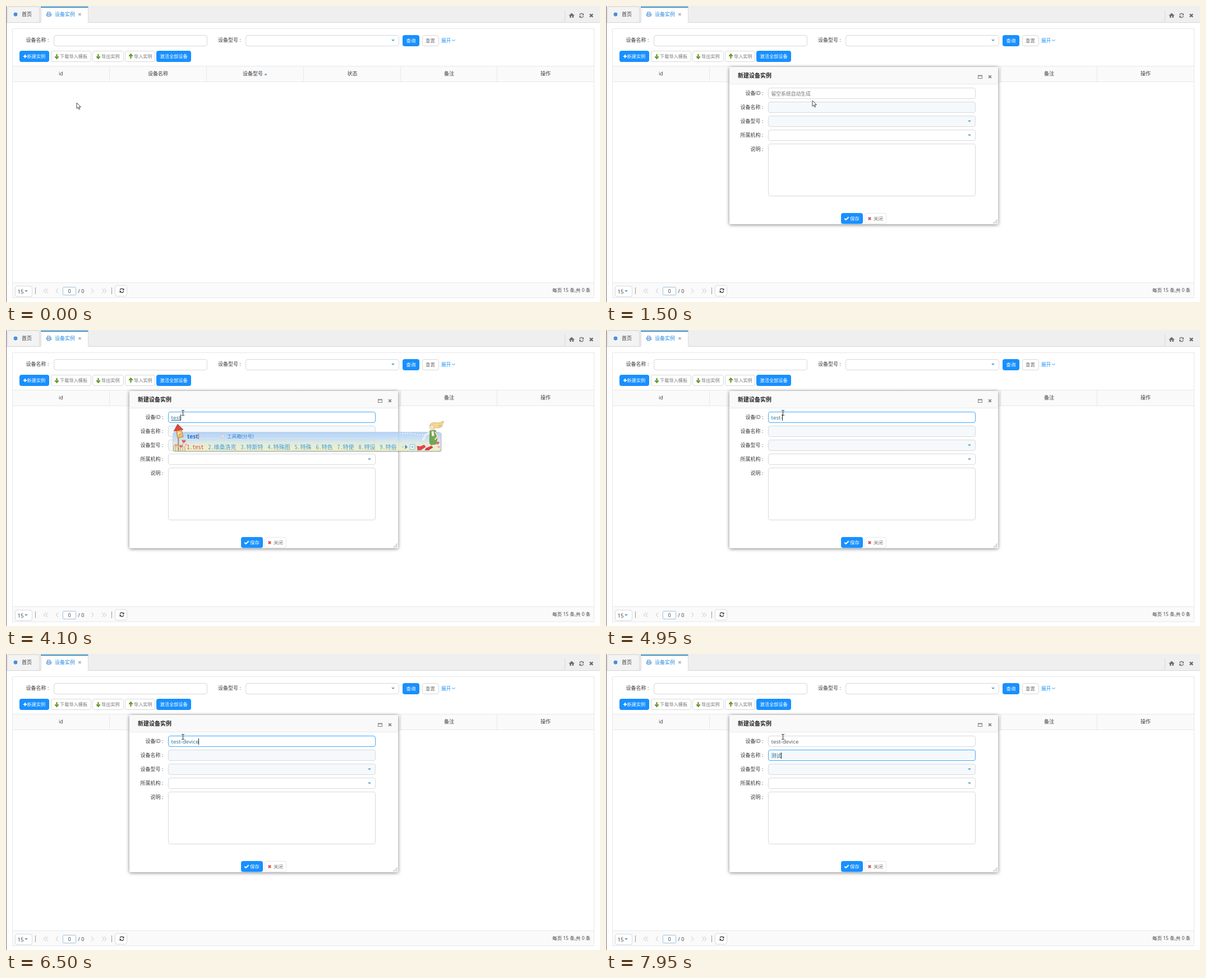
An HTML page for the animation above (8000 ms loop, 1059 by 529 pixels).

```html
<!DOCTYPE html>
<html lang="zh-CN">
<head>
<meta charset="utf-8">
<title>设备实例</title>
<style>
html, body { margin: 0; width: 100%; height: 100%; overflow: hidden; background: #fff; }
svg { display: block; width: 100vw; height: 100vh; }
text { font-family: 'Open Sans', 'Noto Sans CJK SC', 'Noto Sans CJK', sans-serif; white-space: pre; }
.cand text { font-family: 'Noto Sans Mono CJK SC', 'Noto Sans CJK SC', 'Noto Sans CJK', monospace; }
</style>
</head>
<body>
<svg id="stage" viewBox="0 0 1059 529">
  <defs>
    <linearGradient id="sky" x2="0" y2="1">
      <stop stop-color="#a8cdf8"/><stop offset=".35" stop-color="#c3dcf3"/>
      <stop offset=".65" stop-color="#e2ebd6"/><stop offset="1" stop-color="#f5efb0"/>
    </linearGradient>
  </defs>
</svg>
<script>
const LOOP = 8000, STEP = 50;
const BLUE = '#1890ff', LINE = '#d9d9d9', INK = '#3c3c3c', GREY = '#777';
const stage = document.getElementById('stage');
const $ = id => document.getElementById(id);

// Drawing helpers
const text = (x, cy, s, size = 9, fill = INK, attrs = '') =>
  `<text x="${x}" y="${cy + size * .38}" font-size="${size}" fill="${fill}" ${attrs}>${s}</text>`;
const rect = (x, y, w, h, fill, attrs = '') =>
  `<rect x="${x}" y="${y}" width="${w}" height="${h}" fill="${fill}" ${attrs}/>`;
const path = (d, fill, attrs = '') => `<path d="${d}" fill="${fill}" ${attrs}/>`;
const stroke = (d, color, w = 1, attrs = '') =>
  path(d, 'none', `stroke="${color}" stroke-width="${w}" ${attrs}`);
const box = (x, y, w, h, fill = '#fff', color = LINE, attrs = '') =>
  rect(x + .5, y + .5, w - 1, h - 1, fill, `rx="3.5" stroke="${color}" ${attrs}`);
const solid = (x, y, w, h, attrs = '') => rect(x, y, w, h, BLUE, `rx="4" ${attrs}`);
const label = (right, cy, s) =>
  text(right, cy, s, 9, INK, 'text-anchor="end"') + text(right + 2.5, cy, ':');
const cross = (x, y, r, color, w = 2) =>
  stroke(`M${x - r} ${y - r}l${2 * r} ${2 * r}m0 ${-2 * r}l${-2 * r} ${2 * r}`, color, w);
const down = (x, y, color = '#5a9fc9', r = 3) =>
  path(`M${x - r} ${y - r / 2}h${2 * r}l${-r} ${r}z`, color);
const chevron = (x, y, dir, color) =>
  stroke(`M${x - dir * 2} ${y - 4}l${dir * 4} 4l${-dir * 4} 4`, color, 1);
const reload = (x, y, color) => `<g transform="translate(${x} ${y})">` +
  stroke('M-3.4-.8A3.5 3.5 0 0 1 2.8-2.2M3.4.8A3.5 3.5 0 0 1-2.8 2.2', color, 1.4) +
  path('M4-4v3.5h-3.5zM-4 4v-3.5h3.5z', color) + '</g>';
const greenArrow = (x, y, dir) => `<g transform="translate(${x} ${y}) scale(1 ${dir})">` +
  path('M-1.4-4h2.8v4h2.6l-4 4.6l-4-4.6h2.6z', '#7fa83c') +
  path('M-3.6 1.2l1.2-.8l2.4 2.6l2.4-2.6l1.2.8l-3.6 4z', '#5d8a2c') + '</g>';

function topBar() {
  return rect(0, 0, 1059, 30, '#efefef') + rect(0, 29, 1059, 1, '#d8d8d8') +
    path('M2.5 29.5V4a3 3 0 0 1 3-3H57a3 3 0 0 1 3 3V29.5z', '#f3f3f3', 'stroke="#d2d2d2"') +
    `<circle cx="17" cy="15" r="3.4" fill="#4a90d9"/>` + text(28, 15, '首页') +
    rect(62, 1, 84.5, 30, '#fff') + rect(62, 1, 84.5, 2, '#3c8dbc') +
    stroke('M62.5 3v26M146.5 3v26', '#ddd') +
    stroke('M74 14v-3h4.5v3M73 17h-.5v-3h8v3h-.8M74 16h4.7v2.5h-4.7z', '#4a90d9', 1.1) +
    text(87, 15, '设备实例', 9, '#2b8ce6') + cross(131.5, 15, 2, '#aaa', 1.5) +
    rect(996, 8, 1, 21, '#d8d8d8') +
    path('M1003.5 17l5-4.6l5 4.6l-.7.8l-.8-.7v4h-2.5v-3h-2v3h-2.5v-4l-.8.7z', '#707070') +
    reload(1026, 17, '#707070') + cross(1043.5, 17, 2.7, '#666', 2.2);
}

function toolbar() {
  const tool = (x, w, dir, s) => box(x, 80, w, 20) + greenArrow(x + 10.5, 90, dir) +
    text(x + 16, 90, s, 8.2, GREY);
  return rect(11.5, 40.5, 1037, 481, '#fff', 'stroke="#e8e8e8"') +
    label(71.5, 61, '设备名称') + box(85, 52, 274, 20) +
    label(414, 61, '设备型号') + box(427, 52, 274, 20) + down(690, 61.5) +
    solid(707, 52, 30, 20) + text(713.5, 61.5, '查询', 8.5, '#fff') +
    box(742, 52, 30, 20) + text(748, 61.5, '重置', 8.5, GREY) +
    text(776, 61.5, '展开', 8.7, BLUE) + stroke('M795.5 60.2l2.5 2.5l2.5-2.5', BLUE) +
    solid(24, 80, 53, 20, 'id="add"') + stroke('M31 90h6M34 87v6', '#fff', 2) +
    text(37.5, 90, '新建实例', 8.2, '#fff') +
    tool(80, 72, 1, '下载导入模板') + tool(154, 56, 1, '导出实例') +
    tool(212, 54, -1, '导入实例') +
    solid(268, 80, 62, 20) + text(274.5, 90, '激活全部设备', 8.2, '#fff');
}

function table() {
  const heads = [[98, 'id'], [271, '设备名称'], [440, '设备型号'], [617.5, '状态'], [790, '备注'], [962, '操作']];
  return rect(12, 107, 1036, 29, '#fafafa') + rect(12, 107, 172, 29, '#e6f7ff', 'id="idHead"') +
    stroke('M11 107.5H1049M11 135.5H1049', '#e8e8e8') +
    [184, 357, 530, 703, 875].map(x => rect(x, 107, 1, 29, '#e8e8e8')).join('') +
    heads.map(([x, s]) => text(x, 121, s, 9, INK, 'text-anchor="middle"')).join('') +
    path('M460 123.5h6l-3-3z', '#5a9fc9');
}

function footer() {
  const pale = '#c4c4c4';
  return rect(12, 495, 1036, 26, '#fafafa') + rect(11, 494, 1038, 1, '#e8e8e8') +
    box(16, 500, 31, 20) + text(20.5, 510, '15', 9.75) + down(36, 509.5) +
    rect(52, 503, 1, 12, '#999') + rect(188, 503, 1, 12, '#999') +
    chevron(69, 509, -1, pale) + chevron(73, 509, -1, pale) + chevron(91, 509, -1, pale) +
    chevron(154, 509, 1, pale) + chevron(173, 509, 1, pale) + chevron(177, 509, 1, pale) +
    rect(101.5, 502.5, 23, 14, '#fff', 'stroke="#9cc3dc" rx="1"') +
    text(113, 509.5, '0', 9, INK, 'text-anchor="middle"') + text(128.5, 509.5, '/ 0', 9) +
    box(194, 499, 22, 20) + reload(206.5, 508.5, '#444') +
    text(1042, 508, '每页 15 条,共 0 条', 8.5, INK, 'text-anchor="end"');
}

function dialog() {
  const rows = ['设备ID', '设备名称', '设备型号', '所属机构'];
  const fills = ['#fff', '#f5f9fc', '#f5f9fc', '#fff'];
  let grip = '';
  for (let i = 0; i < 3; i++)
    for (let j = 2 - i; j < 3; j++) grip += rect(691 + j * 2.5, 382 + i * 2.5, 1.2, 1.2, '#777');
  const form = rows.map((s, i) => label(275.5, 155.5 + 25 * i, s) +
    box(289, 146 + 25 * i, 370, 20, fills[i], LINE, `id="field${i}"`)).join('') +
    down(648, 206) + down(648, 231) +
    label(275.5, 255.5, '说明') + box(289, 246, 370, 94) +
    text(294.5, 156.5, '留空系统自动生成', 8.8, '#777', 'id="hint"') +
    text(294.5, 156.5, '', 9.75, '#555', 'id="value0"') + text(294.5, 181.5, '', 9, '#555', 'id="value1"') +
    '<path id="under" stroke="#2b6f8f"/><path id="caret" stroke="#222"/>' +
    solid(419, 370, 39, 19.5) + stroke('M425.3 379.8l2.4 2.4l5-5', '#fff', 2) +
    text(435, 379.5, '保存', 8.5, '#fff') +
    box(461, 370, 39, 19.5, '#fff', '#e6e6e6') + cross(470, 380, 2.2, '#d9534f', 2) +
    text(477, 379.5, '关闭', 8.5, GREY);
  return '<g id="dialog">' +
    rect(220, 109, 479, 281, '#fff', 'rx="2" style="filter:drop-shadow(0 1px 3px rgba(0,0,0,.5))"') +
    rect(220, 109, 479, 30, '#f9f9f9', 'rx="2"') + rect(220, 139, 479, 1, '#e8e8e8') +
    text(235, 124, '新建设备实例', 10, '#222', 'font-weight="700"') +
    rect(663.5, 124.5, 7, 5, 'none', 'stroke="#888"') + rect(663, 123.5, 8, 2, '#888') +
    cross(684.5, 126.5, 2.4, '#888', 1.9) + grip + `<g id="form">${form}</g></g>`;
}

// Input method window
const heart = (x, y, r, color = '#e8475a') =>
  path(`M${x} ${y + r}l${-r}${-r}a${r / 2} ${r / 2} 0 0 1 ${r}${-r / 2}a${r / 2} ${r / 2} 0 0 1 ${r} ${r / 2}z`, color);

const birdhouse = rect(9, 190, 2.5, 26, '#a8895c') +
  stroke('M2 216v-10M5.5 216v-12M14 216v-12M18 216v-14M22 216v-9', '#b59a6a', 1.3) +
  stroke('M1 209h22', '#d8c69a', 1.5) +
  path('M6 179l10-1l3 13l-10 2z', '#f0b34c', 'stroke="#8a5a20" stroke-width=".7"') +
  '<circle cx="12" cy="185" r="2.6" fill="#fbe3b0"/><circle cx="13" cy="186" r="1" fill="#7a4a1a"/>' +
  path('M2 181l7-13l10 10z', '#d92a1f', 'stroke="#8d1a12" stroke-width=".6"') +
  heart(20, 199, 3.4) + heart(6, 206, 2.8, '#e88a90') + heart(15, 208, 2.6) + heart(24, 205, 2.2, '#f0a0a8');

const girl = path('M-20 172c0-7 8-7 13-6c5 1 8-3 12-3c-1 5-4 8-9 8c3 1 5 1 7-1c-2 5-8 6-12 4l-5 4z', '#f3d27a', 'stroke="#a5803a" stroke-width=".6"') +
  '<circle cx="-16" cy="174" r="4.2" fill="#fbdcc0" stroke="#b58a60" stroke-width=".5"/>' +
  stroke('M-19 183l-9 5l-4 9', '#fff', 3) + stroke('M-19 183l-9 5l-4 9', '#d8b090', .6) +
  path('M-20 180l10-1c4 7 4 15 1 25l-10 2c-3-9 0-17-1-26z', '#5c9a35', 'stroke="#35641c" stroke-width=".6"') +
  path('M-17 181l4 0l1 8l-4 1z', '#f6efdf') + stroke('M-10 182l4 8l-5 6', '#fbdcc0', 2) +
  stroke('M-18 205l-12 4M-13 205l-4 4', '#fbdcc0', 2.4) +
  path('M-43 207l6 1l7-3l3 4l-9 6l-6 0z', '#d8283a') + path('M-27 211l10-4l3 3l-8 5h-7z', '#c32133') +
  heart(-6, 202, 3) + heart(-4, 209, 2.4, '#f0a0a8');

const itemWidth = s => [...s].reduce((w, c) => w + (c > '\xff' ? 10 : 5), 0);

function imeWindow(typed, cands) {
  let x = 25.5, list = '';
  cands.split(' ').forEach((c, i) => {
    const s = `${i + 1}.${c}`;
    list += text(x, 209, s, 10, i ? '#1f8fe6' : '#e0262c');
    x += itemWidth(s) + 8;
  });
  const end = x - 8, right = end + 79;
  const tip = typed === 'test'
    ? rect(86.5, 187, 6, 6, '#e9e4ee', 'rx="1.5" stroke="#b9a9c4" stroke-width=".7"') +
      text(89.5, 190, 'i', 5, '#d0504a', 'text-anchor="middle"') +
      text(97, 190, '工具箱(分号)', 8.5, '#1674d0') : '';
  return rect(1, 183, right, 35, '#777', 'rx="4" opacity=".55"') +
    rect(.5, 182.5, right - 1, 33.5, 'url(#sky)', 'rx="4" stroke="#b9cfdd"') +
    stroke(`M${right - 74} 185.5q18-2 30 1t14-1`, '#fff', 1.2, 'stroke-dasharray="2 2.5"') +
    birdhouse + text(26, 190, typed, 10, '#0d5cc4', 'font-weight="700" id="typed"') +
    '<path id="bar" stroke="#e0262c"/>' + tip + `<g class="cand">${list}</g>` +
    path(`M${end + 12} 206v6l-3.5-3z`, '#b8cfe0') + path(`M${end + 15} 205v8l4.5-4z`, '#1778d8') +
    rect(end + 23.5, 204.5, 9, 9, '#e6f2fa', 'rx="1" stroke="#6fb0dd"') + down(end + 28, 209.2, '#1778d8', 2) +
    `<g transform="translate(${right} 0)">${girl}</g>`;
}

const cursors = {
  arrow: path('M0 0V10.2L2.4 8L4 11.8L5.7 11L4.1 7.4H7.3Z', '#fff', 'stroke="#333" stroke-width=".9"'),
  hand: path('M-1 1a1 1 0 0 1 2 0v4l5 1.3q1 .4.8 1.5l-.9 4.2h-5.4l-4-5q.6-1.4 2.5.4z', '#fff', 'stroke="#333" stroke-width=".9"'),
  move: path('M0-6.5l2.5 2.7h-1.5v2.8h2.8v-1.5l2.7 2.5l-2.7 2.5v-1.5h-2.8v2.8h1.5l-2.5 2.7l-2.5-2.7h1.5v-2.8h-2.8v1.5l-2.7-2.5l2.7-2.5v1.5h2.8v-2.8h-1.5z', '#fff', 'stroke="#333" stroke-width=".9"'),
  beam: stroke('M-2.5-4.5h2l.5.5l.5-.5h2M0-4v8M-2.5 4.5h2l.5-.5l.5.5h2', '#333')
};

stage.insertAdjacentHTML('beforeend',
  topBar() + toolbar() + table() + footer() + rect(0, 0, 1, 529, '#77707c') + dialog() +
  '<g id="status">' + rect(-3.5, 518.5, 28, 14, '#f4f4f4', 'rx="3" stroke="#dcdcdc"') +
  text(-1, 525, '板.xlsx', 7, '#666') + '</g><g id="ime"></g>' +
  Object.entries(cursors).map(([k, s]) => `<g id="${k}">${s}</g>`).join(''));

// Typing: time, field, committed text, text being composed, candidates
const typing = [
  [0, -1, '', ''],
  [2250, 0, '', ''],
  [3100, 0, '', 't', '他 她 它 天 太 头 条 听 图'],
  [3250, 0, '', 'te', '特 忒 铽 忑 慝 貣 蟘 脦 鋱'],
  [3500, 0, '', 'tes', '特色 特殊 特设 特使 特别是 特俗 特首 特工队 特赦'],
  [3650, 0, '', 'test', 'test 维桑洛克 特斯特 特殊图 特殊 特色 特使 特设 特俗'],
  [4150, 0, 'test', ''],
  [4950, 0, 'test-', ''],
  [5200, 0, 'test-', 'd', '的 都 到 大家 电话 等待 对 但是 多少'],
  [5250, 0, 'test-', 'de', '的 得 德 地 嘚 锝 鍀 淂 惪'],
  [5550, 0, 'test-', 'dev', 'Dev 的女⊘ 的 得 德 地 嘚 锝 鍀'],
  [5950, 0, 'test-', 'devi', 'devi 的为 得为 的 得 德 地 嘚 锝'],
  [6100, 0, 'test-', 'devic', 'devic 的此 得此 德才 的 得 德 地 嘚'],
  [6200, 0, 'test-', 'device', 'device 的 得 德 地 嘚 锝 鍀 淂'],
  [6500, 0, 'test-device', ''],
  [6800, 1, '', ''],
  [7100, 1, '', 'c', '从 才 次 错 草 此 存 猜 曾'],
  [7250, 1, '', 'ce', '测 册 侧 策 厕 恻 岑 参 曾'],
  [7450, 1, '', 'ceshi', '测试 侧室 测时 策士 侧视 测试仪 册使 侧石 测师'],
  [7950, 1, '测试', '']
];

// Pointer: time, x, y
const track = [
  [0, 126, 173], [500, 56, 88], [850, 56, 88], [900, 150, 104], [950, 237, 125],
  [1250, 352, 161], [1500, 368, 169], [1600, 365, 171], [1800, 365, 171], [2050, 315.5, 148]
];

const within = (t, a, b) => t >= a && t < b;
const show = (id, on) => $(id).setAttribute('display', on ? 'inline' : 'none');

function pointer(t) {
  const i = track.findIndex(k => k[0] > t);
  if (i < 0) return track[track.length - 1].slice(1);
  const [t0, x0, y0] = track[i - 1], [t1, x1, y1] = track[i];
  let p = (t - t0) / (t1 - t0);
  if (t1 - t0 > 200) p = p * p * (3 - 2 * p);
  return [x0 + (x1 - x0) * p, y0 + (y1 - y0) * p];
}

let current = -1;
function applyTyping(n) {
  if (n === current) return;
  current = n;
  const [, field, done, comp, cands] = typing[n];
  const values = field === 1 ? ['test-device', done + comp] : [done + comp, ''];
  [0, 1].forEach(i => {
    const on = field === i, v = $('value' + i);
    $('field' + i).setAttribute('stroke', on ? '#40a9ff' : LINE);
    v.textContent = values[i];
    v.setAttribute('fill', on ? '#2b6f8f' : '#555');
  });
  show('hint', !values[0]);
  $('under').removeAttribute('d');
  $('ime').innerHTML = '';
  if (field < 0) return;

  const v = $('value' + field), y = 151 + 25 * field;
  const len = k => k ? v.getSubStringLength(0, k) : 0;
  const start = 294.5 + len(done.length), end = 294.5 + len(values[field].length);
  $('caret').setAttribute('d', `M${Math.floor(end) + .5} ${y}v11`);
  if (!comp) return;
  $('under').setAttribute('d', `M${start} ${y + 10.5}H${end}`);
  $('ime').innerHTML = imeWindow(comp, cands);
  $('ime').setAttribute('transform', `translate(${Math.round(start + 2.5)} ${25 * field})`);
  $('bar').setAttribute('d', `M${26.8 + $('typed').getComputedTextLength()} 185v10`);
}

function draw(t) {
  const [x, y] = pointer(t);
  const kind = t >= 1800 && y < 166 ? 'beam'
    : within(t, 400, 900) ? 'hand'
    : within(t, 950, 1050) ? 'move' : 'arrow';
  Object.keys(cursors).forEach(k => show(k, k === kind));
  $(kind).setAttribute('transform', `translate(${x} ${y})`);

  show('idHead', t < 400 && within(y, 107, 136) || within(t, 900, 1050));
  $('add').setAttribute('fill', within(t, 400, 1000) ? '#40a9ff' : BLUE);
  show('status', within(t, 900, 1050));
  show('dialog', t >= 900);
  show('form', t >= 1300);

  let n = 0;
  while (n + 1 < typing.length && typing[n + 1][0] <= t) n++;
  applyTyping(n);
  show('caret', t >= 2250 && !within(t, 2800, 3100) && !within(t, 4650, 4950));
  const fade = within(t, 4050, 4150) ? t - 4000 : within(t, 7850, 7950) ? t - 7800 : 0;
  $('ime').setAttribute('opacity', 1 - fade / 700);
}

const begin = performance.now();
function tick() {
  const t = (performance.now() - begin) % LOOP;
  draw(Math.floor(t / STEP) * STEP);
  requestAnimationFrame(tick);
}
tick();
</script>
</body>
</html>
```
